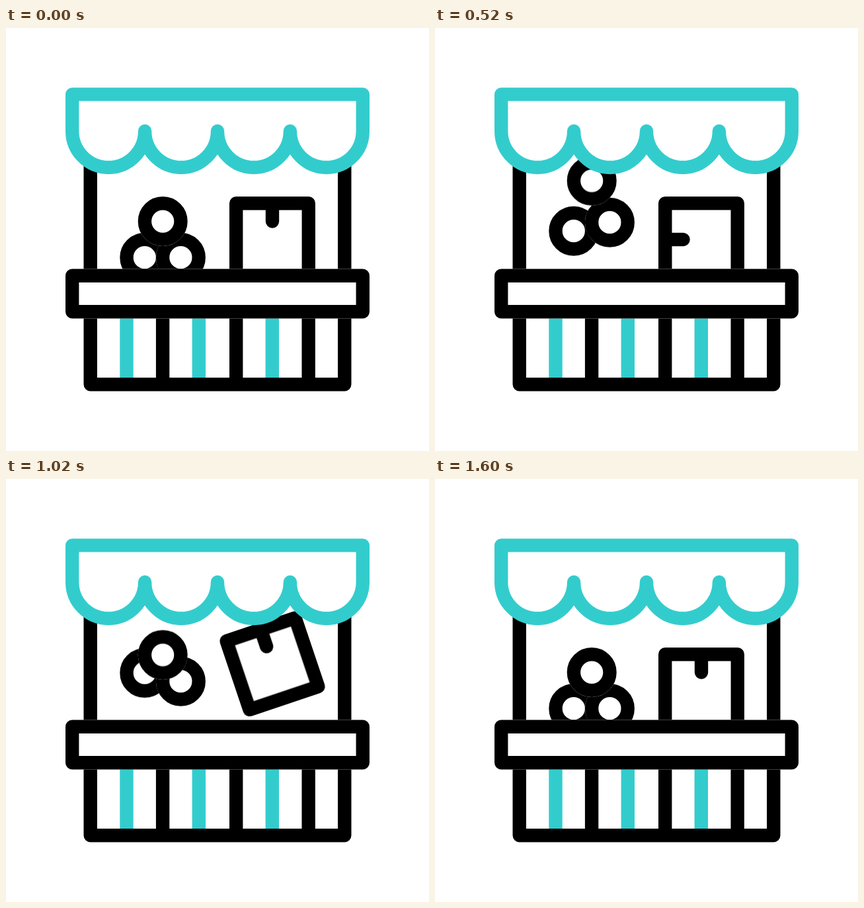
An HTML page that plays this animation: 640x640 px, repeating every 2.4 s.

```html
<!DOCTYPE html>
<html lang="en">
<head>
<meta charset="utf-8">
<title>Market stall</title>
<style>
  html, body { margin: 0; width: 100%; height: 100%; overflow: hidden; background: #fff; }
  svg { display: block; width: 100%; height: 100%; }

  .line { fill: none; stroke: #000; stroke-width: 20.4; stroke-linecap: round; stroke-linejoin: round; }
  .teal { stroke: #33cccd; }
  .flat { stroke-linecap: butt; }
  .solid { fill: #fff; }

  .ball, .toss, .spin {
    animation: hop 2400ms cubic-bezier(.3333, 0, .6667, 1) infinite backwards;
  }
  .right { animation-delay: 58ms; }
  .top { animation-delay: 116ms; }
  .toss { animation-name: toss; }
  .spin { animation-name: spin; transform-origin: 0 0; }

  @keyframes hop {
    0%, 30.83%, 61.67%, 100% { transform: translateY(0); }
    15.42%, 46.25% { transform: translateY(-63px); }
  }
  @keyframes toss {
    0%, 20.42%, 23.08%, 50%, 100% { transform: translateY(0); }
    10.21%, 36.54% { transform: translateY(-69.5px); }
  }
  @keyframes spin {
    0%, 50.42%, 100% { transform: rotate(0deg); }
    20.3%, 23.5% { transform: rotate(-90deg); }
  }
</style>
</head>
<body>
<svg viewBox="0 0 640 640">
  <defs>
    <g id="ring">
      <circle r="37.5" fill="#fff"/>
      <circle class="line" r="27.3"/>
    </g>
  </defs>

  <!-- posts -->
  <path class="line flat" d="M127.7 190V375M512.3 190V375"/>

  <!-- fruit -->
  <g class="ball"><use href="#ring" x="209.8" y="347.2"/></g>
  <g class="ball right"><use href="#ring" x="264.4" y="347.2"/></g>
  <g class="ball top"><use href="#ring" x="237.2" y="292.6"/></g>

  <!-- parcel -->
  <g transform="translate(403 320)">
    <g class="toss"><g class="spin">
      <rect class="line solid" x="-54.8" y="-54.8" width="109.6" height="109.6"/>
      <path class="line" d="M0 -54.8V-27.4"/>
    </g></g>
  </g>

  <!-- awning -->
  <path class="line teal solid" d="M100.2 100.4H539.8V156a54.9 54.9 0 0 1-109.9 0a54.9 54.9 0 0 1-109.9 0a54.9 54.9 0 0 1-109.9 0a54.9 54.9 0 0 1-109.9 0Z"/>

  <!-- base -->
  <path class="line flat teal" d="M182.5 430V539M291.8 430V539M402.8 430V539"/>
  <path class="line flat" d="M237.1 430V539M348.2 430V539M457.7 430V539"/>
  <path class="line" d="M127.7 430V539.3H512.3V430"/>

  <!-- counter -->
  <rect x="90" y="364.5" width="460" height="75" rx="10.2" fill="#fff"/>
  <rect class="line" x="100.2" y="374.7" width="439.6" height="54.6"/>
</svg>
</body>
</html>
```
